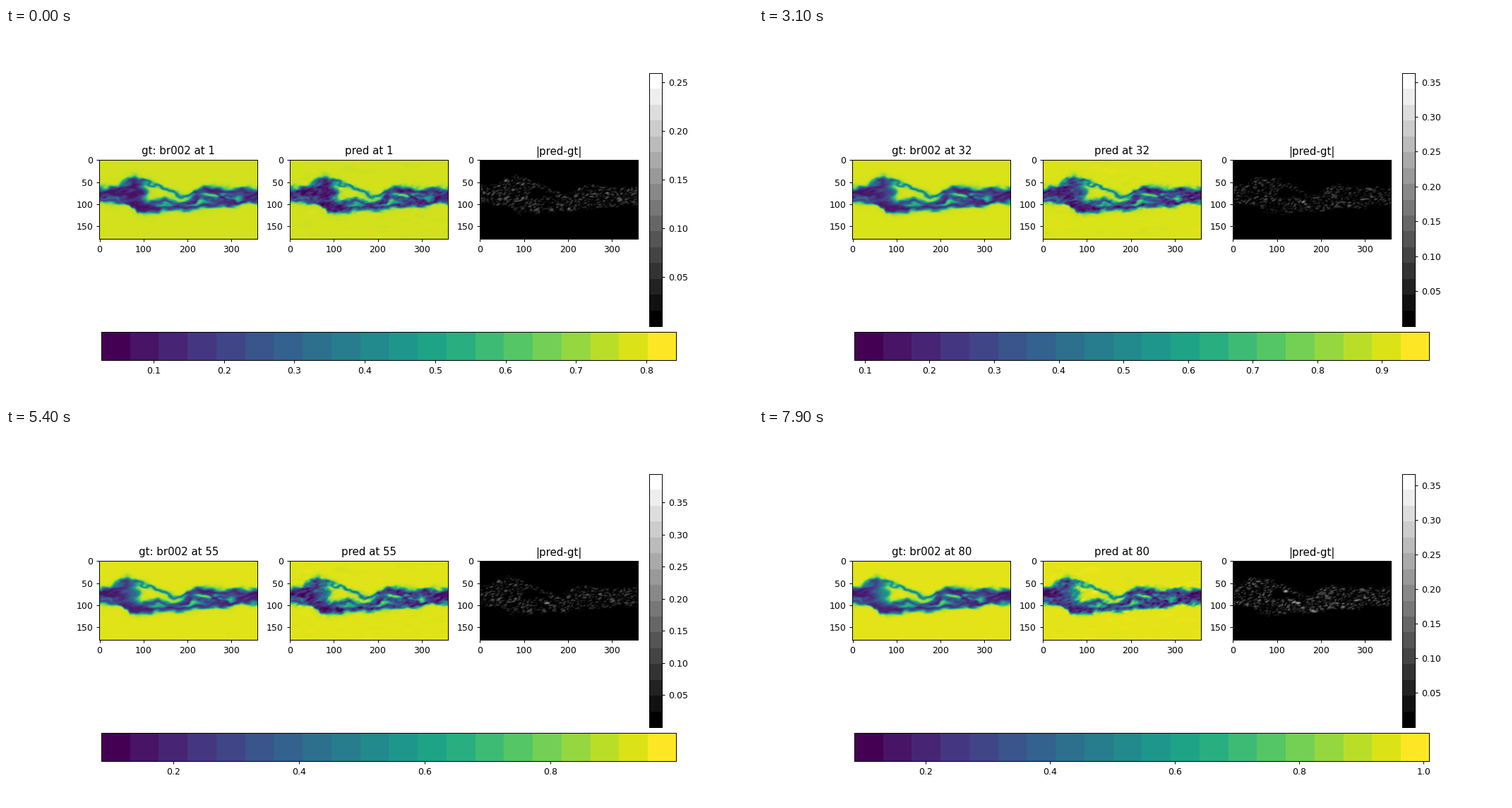
Recreate the animation shown at these times as a matplotlib script. Size 1058 px wide and 529 px high, loop 8 s.

```python
import numpy as np
import matplotlib.pyplot as plt
from matplotlib.animation import FuncAnimation

W, H, DPI = 1058, 529, 90
N, STEP = 80, 100
NX, NY, PAD = 360, 180, 40
DRIFT = 24 / (N - 1)

# Upper ends of both colour scales at a few moments
KEYS = [0, 8, 21, 31, 44, 63, 79]
HIGH = [.8426, .8914, .965, .9732, 1.0045, .9954, 1.009]
ERR_MAX = [.2594, .1811, .3215, .3627, .409, .3814, .3664]

# Strong error spots: x, y, moment of appearance
HOT = [(170, 96, 4), (205, 114, 38), (144, 70, 55)]

rng = np.random.default_rng(2)
Y, X = np.mgrid[0:NY, 0:NX + PAD].astype(float)


def ease(x, a, b):
    t = np.clip((x - a) / (b - a), 0, 1)
    return t * t * (3 - 2 * t)


def sig(z):
    return 1 / (1 + np.exp(-np.clip(z, -40, 40)))


def spot(x, y, rx, ry):
    return np.exp(-((X - x) / rx) ** 2 - ((Y - y) / ry) ** 2)


def blur(f, a, b, tilt=0.0):
    ky = 2 * np.pi * np.fft.fftfreq(f.shape[0])[:, None]
    kx = 2 * np.pi * np.fft.fftfreq(f.shape[1])[None, :]
    u = kx * np.cos(tilt) + ky * np.sin(tilt)
    v = ky * np.cos(tilt) - kx * np.sin(tilt)
    return np.fft.ifft2(np.fft.fft2(f) * np.exp(-(a * a * u * u + b * b * v * v) / 2)).real


def noise(a, b, tilt=0.0):
    n = blur(rng.standard_normal(X.shape), a, b, tilt)
    return n / n.std()


def mixing_mask(x, y):
    """Broad body on the left, then strands that braid towards the right."""
    roof = 66 - 21 * ease(x, 5, 85)
    floor = 98 + 21 * ease(x, 64, 80)
    body = sig((y - roof) / 2.4) * sig((floor - y) / 2.4) * sig((103 - x) / 4)

    top = 47 + 34 * ease(x, 92, 190) - 10 * ease(x, 200, 240) + 5 * ease(x, 270, 340)
    low = 109 - 11 * ease(x, 220, 290) - 11 * ease(x, 300, 350)
    mid = 96 - 14 * ease(x, 200, 340) + 4 * np.sin(x / 13)
    braid = (top + low) / 2 + (low - top) / 2 * np.sin((x - 150) / 20)
    strands = [(top, 1.6 + 5 * ease(x, 190, 235), 90),
               (low, 12 - 7 * ease(x, 95, 165) + 2 * ease(x, 320, 370), 80),
               (mid, 4, 112),
               (braid, 4, 170)]
    clear = 1 - body
    for line, half, start in strands:
        clear *= 1 - sig((half - np.abs(y - line)) / 2.1) * sig((x - start) / 3)
    streak = sig((2 - np.abs(y - 88)) / 1.5) * sig((58 - x) / 4)
    return (1 - clear) * (1 - .45 * streak)


mask = mixing_mask(X + 4 * noise(9, 7) + 1.6 * noise(4, 3),
                   Y + 2.2 * noise(10, 6) + 1.4 * noise(4.5, 3))
mask *= 1 - .07 * np.abs(noise(7, 2.5, -.2))
fade = mask * spot(97, 72, 24, 26)

active = blur(2.4 * mask * (1 - mask) + .4 * mask, 4, 3)
active = np.clip(active / active.max() * 1.25, 0, 1)
active[active < .06] = 0
grain = [noise(2.8, 1.4, -.35) for _ in range(2)]
patch = [noise(9, 2.5, -.1) for _ in range(2)]


def scales(k):
    low = .0259 + .06 * (1 - np.exp(-k / 9))
    return low, np.interp(k, KEYS, HIGH), np.interp(k, KEYS, ERR_MAX)


def window(f, k):
    """Part of the wide field in view while it drifts to the left."""
    i, r = divmod(k * DRIFT, 1)
    i = int(i)
    return (1 - r) * f[:, i:i + NX] + r * f[:, i + 1:i + 1 + NX]


def turn(pair, a):
    return pair[0] * np.cos(a) + pair[1] * np.sin(a)


def fields(k):
    low, high, top = scales(k)
    t = k / (N - 1)
    level = low + (.93 + .03 * t) * (high - low)
    gt = level - (level - low) * .97 * window(mask - .45 * t * fade, k)
    diff = (.036 + .022 * t) * active * turn(grain, .06 * k)
    for x, y, start in HOT:
        diff += .6 * top * ease(k, start, start + 18) * spot(x, y, 6, 3)
    diff = window(diff, k)
    haze = window(turn(patch, .11 * k), k)
    haze = .007 * np.sign(haze) * np.maximum(np.abs(haze) - 1.1, 0)
    return gt, gt + diff - haze, np.abs(diff)


def box(x0, y0, x1, y1):
    return fig.add_axes([x0 / W, 1 - y1 / H, (x1 - x0) / W, (y1 - y0) / H])


def panel(i, cmap):
    x = 132.25 + 269.4 * i
    ax = box(x, 187, x + 224.2, 299.3)
    im = ax.imshow(np.zeros((NY, NX)), cmap=cmap, aspect="auto")
    ax.set_xticks(range(0, NX, 100))
    ax.set_yticks(range(0, NY, 50))
    return im, ax.set_title("")


def bar(ax, steps, cmap):
    return ax.imshow(steps, cmap=cmap, aspect="auto", origin="lower",
                     interpolation="nearest")


fig = plt.figure(figsize=(W / DPI, H / DPI), dpi=DPI)
gray = plt.get_cmap("gray", 16)
gt_im, gt_title = panel(0, "viridis")
pred_im, pred_title = panel(1, "viridis")
err_im, err_title = panel(2, gray)
err_title.set_text("|pred-gt|")

hbar = box(135.2, 430.8, 949.4, 471)
hbar_im = bar(hbar, np.arange(20)[None, :], plt.get_cmap("viridis", 20))
hbar.set_yticks([])

vbar = box(911.3, 64, 929.3, 422.6)
vbar_im = bar(vbar, np.arange(16)[:, None], gray)
vbar.set_xticks([])
vbar.yaxis.tick_right()


def draw(k):
    gt, pred, err = fields(k)
    low, high, top = scales(k)
    for im, data in ((gt_im, gt), (pred_im, pred)):
        im.set_data(data)
        im.set_clim(low, high)
    err_im.set_data(err)
    err_im.set_clim(0, top)
    gt_title.set_text(f"gt: br002 at {k + 1}")
    pred_title.set_text(f"pred at {k + 1}")

    hbar_im.set_extent((low, high, 0, 1))
    hbar.set_xlim(low, high)
    vbar_im.set_extent((0, 1, 1e-5, top))
    vbar.set_ylim(1e-5, top)
    return []


anim = FuncAnimation(fig, draw, frames=N, interval=STEP, repeat=True,
                     repeat_delay=0, init_func=lambda: draw(0))
plt.show()
```
